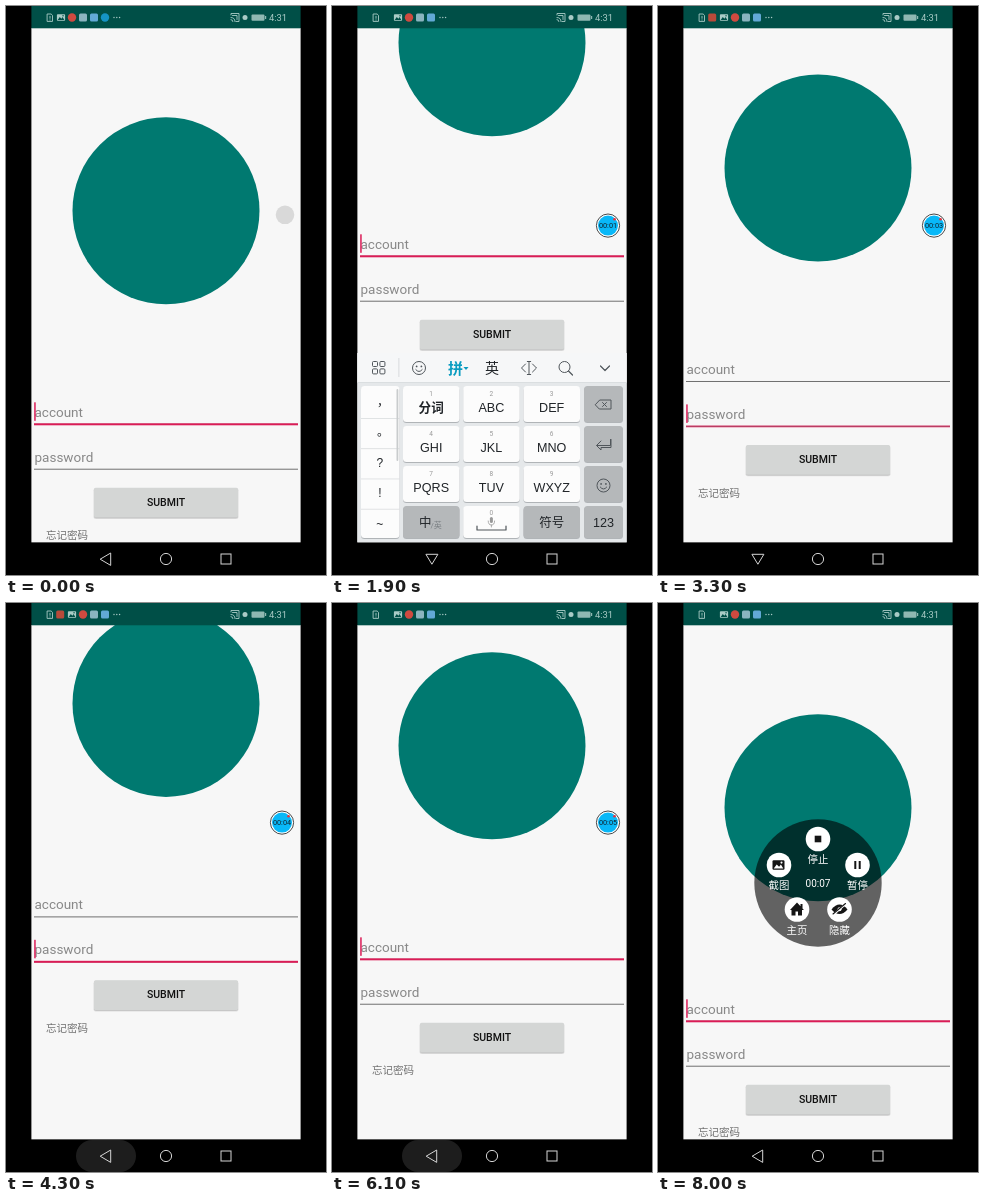
Recreate the animation shown at these times as an HTML page. Size 320 by 569 pixels, loop 8.1 s.

```html
<!DOCTYPE html>
<html lang="zh">
<head>
<meta charset="utf-8">
<title>Login keyboard demo</title>
<style>
html, body { margin: 0; width: 100%; height: 100%; overflow: hidden; background: #000; }
svg { display: block; width: 100vw; height: 100vh; font-family: Roboto, "Noto Sans CJK SC", "Noto Sans CJK", sans-serif; }
text { white-space: pre; }
.mid { text-anchor: middle; }
.cap { font-family: "Liberation Sans", "Noto Sans CJK SC", "Noto Sans CJK", sans-serif; }
.line { fill: none; stroke-linecap: round; stroke-linejoin: round; }
</style>
</head>
<body>
<svg id="stage" viewBox="0 0 320 569" xmlns="http://www.w3.org/2000/svg"></svg>
<script>
const LOOP = 8100, PAN = 168;
const LEFT = 25.4, WIDTH = 269.2, BOTTOM = 536.6;
const ACCENT = '#da1c56';
const stage = document.getElementById('stage');

const rect = (x, y, w, h, fill, r = 0, extra = '') =>
  `<rect x="${x}" y="${y}" width="${w}" height="${h}" rx="${r}" fill="${fill}" ${extra}/>`;
const disc = (x, y, r, fill, extra = '') =>
  `<circle cx="${x}" cy="${y}" r="${r}" fill="${fill}" ${extra}/>`;
const label = (x, y, size, fill, str, extra = '') =>
  `<text x="${x}" y="${y}" font-size="${size}" fill="${fill}" ${extra}>${str}</text>`;
const mid = (x, y, size, fill, str, extra = '') =>
  label(x, y, size, fill, str, 'text-anchor="middle" ' + extra);
const stroke = (d, color, w = 1, extra = '') =>
  `<path class="line" d="${d}" stroke="${color}" stroke-width="${w}" ${extra}/>`;
const group = (id, body, extra = '') => `<g id="${id}" ${extra}>${body}</g>`;

function smile(x, y, color) {
  return disc(x, y, 6.5, 'none', `stroke="${color}"`) + disc(x - 2.4, y - 1.6, .9, color) +
    disc(x + 2.4, y - 1.6, .9, color) + stroke(`M${x - 3.2} ${y + 1.6}q3.2 4 6.4 0`, color);
}

function picture(x, y, s, color, hole) {
  return rect(x - 5 * s, y - 4 * s, 10 * s, 8 * s, color, s) +
    `<path d="M${x - 4 * s} ${y + 3 * s}l${2.5 * s} ${-3.5 * s} ${2 * s} ${2 * s} ${1.5 * s} ${-2 * s} ${2 * s} ${3.5 * s}z" fill="${hole}"/>` +
    disc(x + 2.5 * s, y - 2 * s, .9 * s, hole);
}

function page() {
  const field = (y, id, name) =>
    label(28.5, y - 7.5, 13.5, '#888', name) +
    rect(28, y - .5, 264, 1, '#707070') +
    rect(28, y - 1, 264, 2, ACCENT, 0, `id="${id}Line"`) +
    rect(28.2, y - 22, 1.5, 18.5, ACCENT, 0, `id="${id}Caret"`);
  return disc(160, 204.8, 93.5, '#007970') +
    field(418.3, 'account', 'account') + field(463.2, 'password', 'password') +
    rect(87.5, 482.6, 145, 30.4, '#000', 2, 'opacity=".1"') +
    rect(88, 482.2, 144, 30, '#000', 2, 'opacity=".14"') +
    rect(88, 481.7, 144, 29.8, '#d4d6d5', 1.5) +
    mid(160, 499.8, 10.5, '#111', 'SUBMIT', 'font-weight="500"') +
    label(40, 533.4, 10.5, '#707070', '忘记密码');
}

function keyboard() {
  const ink = '#202428', soft = '#50565b';
  const cols = [71, 131.2, 191.5], rows = [380, 420, 460, 500];
  const key = (x, y, w, h, fill) =>
    rect(x, y + 1, w, h, '#9a9fa3', 3.5, 'opacity=".7"') + rect(x, y, w, h, fill, 3.5);
  let out = rect(25, 347, 270, 190, '#e5e8ea') + rect(25, 347, 270, 29.5, '#f6f7f8') +
    rect(25, 376, 270, .7, '#d3d7da');

  for (const dx of [0, 7.4]) for (const dy of [0, 7.4])
    out += rect(40.5 + dx, 355.5 + dy, 5, 5, 'none', 1, `stroke="${soft}"`);
  out += rect(66.5, 352, .8, 19, '#cfd3d6') + smile(87, 362, soft) +
    mid(123.5, 367.5, 15, '#0a9cc0', '拼', 'font-weight="700"') +
    '<path d="M131.5 361h5l-2.5 3z" fill="#0a9cc0"/>' +
    mid(160, 367, 14, ink, '英') +
    stroke('M193.5 358l-4 4 4 4M200.5 358l4 4-4 4M197 355.5v13M195.3 355.5h3.4M195.3 368.5h3.4', soft) +
    disc(232.5, 361, 5.5, 'none', `stroke="${soft}"`) + stroke('M236.5 365l4 4', soft, 1.2) +
    stroke('M268.5 360l4.5 4.5 4.5-4.5', soft, 1.2);

  out += key(29, 380, 38.5, 152, '#fcfcfc');
  ['，', '。', '?', '!', '~'].forEach((c, i) => {
    out += label(i < 2 ? 45 : 47.8, [400, 430, 460.5, 490.5, 521.5][i], 12, ink, c,
      i < 2 ? '' : 'class="mid cap"');
    if (i) out += rect(29, 382 + i * 30.2, 38.5, .7, '#d5d8da');
  });
  out += rect(64.5, 383, 1.8, 72, '#c9cccd', .9);

  ['分词', 'ABC', 'DEF', 'GHI', 'JKL', 'MNO', 'PQRS', 'TUV', 'WXYZ'].forEach((name, i) => {
    const x = cols[i % 3], y = rows[i / 3 | 0];
    out += key(x, y, 56.5, 36, '#fcfcfc') + mid(x + 28.2, y + 10, 6.5, '#999', i + 1) +
      mid(x + 28.2, y + 25.8, 12.6, ink, name, `class="cap" ${i ? '' : 'font-weight="700"'}`);
  });
  out += key(cols[0], 500, 56.5, 32, '#b5b8ba') + label(87, 521, 12.5, ink, '中') +
    label(98.5, 521.5, 8, '#7b8084', '/英') +
    key(cols[1], 500, 56.5, 32, '#fcfcfc') + mid(159.4, 509, 6.5, '#999', 0) +
    rect(157.9, 511, 3, 6, '#999', 1.5) + stroke('M156.2 515q0 4 3.2 4t3.2-4M159.4 519v2', '#999', .8) +
    stroke('M145 520v4h29v-4', soft, 1.2) +
    key(cols[2], 500, 56.5, 32, '#b5b8ba') + mid(219.7, 521, 12.5, ink, '符号');
  rows.forEach((y, i) => out += key(252, y, 39, i < 3 ? 36 : 32, '#b5b8ba'));
  return out + stroke('M263.5 398.5l4.2-4.5h11.3v9h-11.3zM270.5 396.5l4 4M274.5 396.5l-4 4', soft) +
    stroke('M278.5 433.5v6h-13.5M269 435l-4.5 4.5 4.5 4.5v-2.5h10v-8', soft) +
    smile(271.5, 479.5, soft) + mid(271.5, 521, 12.6, ink, '123', 'class="cap"');
}

function statusBar() {
  const pale = '#a9cbc6', dark = '#004f47';
  const red = '#cf4a40', sky = '#8ab4bf', blue = '#62a9d6';
  const apps = x => picture(x, 11.5, .82, pale, dark) + disc(x + 11, 11.5, 4.2, red) +
    rect(x + 18, 7.5, 8, 8, sky, 1.5) + rect(x + 29, 7.5, 8, 8, blue, 1.5);
  return rect(LEFT, 0, WIDTH, 22.3, dark) +
    stroke('M41.5 8h3.600l1.400 1.400v6h-5z', pale, .9) + stroke('M44 10.300v2M44 13.900v.2', pale, .9) +
    group('before', apps(55) + disc(99, 11.5, 4.2, '#1593c4')) +
    group('during', apps(66)) +
    rect(50.2, 7.5, 8, 8, '#b84a3a', 1.5, 'id="rec"') +
    [108, 110.8, 113.6].map(x => disc(x, 11.5, .7, pale)).join('') +
    stroke('M225 9v-1.5h8v8h-3M225 11.5q4 0 4 4M225 13.6q1.9 0 1.9 1.9M226.5 9.5h4.5v4', pale, .9) +
    disc(239, 11.5, 2.5, pale) +
    rect(245.5, 8.5, 13, 6.2, '#8fb8b2', 1) + rect(259, 10, 1.2, 3, '#8fb8b2') +
    label(263, 15, 9.4, pale, '4:31');
}

function navBar() {
  const c = '#d5d5d5';
  return rect(25, BOTTOM, 270, 33, '#000') +
    rect(70, 537, 60, 32, '#1d1d1d', 16, 'id="ripple"') +
    stroke('M94.5 553l10.2-6v12z', c, 1, 'id="back"') +
    stroke('M94.3 548.3h11.6l-5.8 9.6z', c, 1, 'id="down"') +
    disc(160, 553, 5.6, 'none', `stroke="${c}"`) +
    rect(215, 548, 10, 10, 'none', 0, `stroke="${c}"`);
}

function menu() {
  const k = '#151515';
  const item = (x, y, name) => disc(x, y, 12.3, '#fff') + mid(x, y + 24.3, 10.4, '#fff', name);
  return disc(0, 0, 63.7, '#000', 'opacity=".6"') +
    item(0, -44, '停止') + rect(-3.3, -47.3, 6.6, 6.6, k) +
    item(-39, -18, '截图') + picture(-39.5, -18, 1.2, k, '#fff') +
    item(39.5, -18, '暂停') + rect(36.3, -22, 2, 8, k) + rect(40.7, -22, 2, 8, k) +
    item(-21, 26.5, '主页') +
    `<path d="M-28 27l7-7.5 3.5 3.7v-2.2h2v4.4l1.5 1.6h-2v5.5h-4v-4h-2.5v4h-4v-5.5z" fill="${k}"/>` +
    item(21.5, 26.5, '隐藏') +
    `<path d="M13.5 26.5q8-10 16 0q-8 9-16 0z" fill="${k}"/>` + disc(21.5, 26.2, 2, '#fff') +
    stroke('M15.5 31.5l12-10.5', '#fff', 2.2) + stroke('M15 31l12.5-10.5', k, 1.1) +
    mid(0, 3.6, 10, '#fff', '00:00', 'id="menuTime"');
}

stage.innerHTML =
  `<defs><clipPath id="pageClip">${rect(LEFT, 22, WIDTH, BOTTOM - 22, '#000')}</clipPath></defs>` +
  rect(0, 0, 320, 569, '#000') + rect(LEFT, 22, WIDTH, BOTTOM - 22, '#f7f7f7') +
  `<g clip-path="url(#pageClip)">${group('page', page())}${group('keys', keyboard())}</g>` +
  statusBar() + navBar() +
  disc(279, 208.8, 9.3, '#d9d9d9', 'id="ball"') +
  group('badge', disc(0, 0, 11.6, '#fff', 'stroke="#333" stroke-width=".9"') + disc(0, 0, 10, '#08b8f8') +
    disc(6.5, -6.3, 1.3, '#e8323c') + mid(0, 2.6, 7.3, '#10222c', '00:00', 'id="badgeTime"')) +
  group('menu', menu());

const el = {};
stage.querySelectorAll('[id]').forEach(n => el[n.id] = n);
const set = (id, name, value) => el[id].setAttribute(name, value);
const fade = (id, v) => set(id, 'opacity', +v);

const ramp = (t, a, b) => Math.min(1, Math.max(0, (t - a) / (b - a)));
const ease = (t, a, b) => { const p = ramp(t, a, b); return p * p * (3 - 2 * p); };
const within = (t, spans) => spans.some(([a, b]) => t >= a && t < b);
// Alternating open and close starts, each lasting dur
const toggle = (t, starts, dur) =>
  starts.reduce((v, a, i) => v + (i % 2 ? -1 : 1) * ease(t, a, a + dur), 0);

const panStarts = [1180, 2275, 3202, 4175.500, 4975, 5924.500];
const keyStarts = [1200, 2200, 3360, 4080, 4840, 5890];
const caretOn = [[0, 400], [900, 1400], [1900, 2400], [2900, 3600], [4100, 4600],
  [4900, 5400], [5900, 6400], [6900, 7400], [7900, LOOP]];
const recOn = [[300, 1700], [2200, 2700], [3200, 3700], [4200, 4700]];
const keysUp = [[1150, 2250], [3150, 4180], [4880, 5950]];

function draw(t) {
  set('page', 'transform', `translate(0 ${-PAN * toggle(t, panStarts, 300)})`);

  const kb = toggle(t, keyStarts, 155);
  fade('keys', kb);
  set('keys', 'transform', `translate(0 ${38 * (1 - kb)})`);

  const onPass = t >= 3100 && t < 4860, caret = within(t, caretOn);
  fade('accountCaret', caret && !onPass);
  fade('passwordCaret', caret && onPass);
  fade('accountLine', 1 - ramp(t, 3100, 3220) + ramp(t, 4860, 4980));
  fade('passwordLine', ramp(t, 3150, 3380) - ramp(t, 4860, 4980));

  fade('before', t < 300);
  fade('during', t >= 300);
  fade('rec', within(t, recOn));

  const down = within(t, keysUp);
  fade('down', down);
  fade('back', !down);
  fade('ripple', [2170, 4100, 5900].reduce((v, a) =>
    v + ramp(t, a, a + 90) - ramp(t, a + 320, a + 480), 0));

  const sec = '00:0' + Math.max(0, Math.floor((t - 200) / 1000));
  el.badgeTime.textContent = el.menuTime.textContent = sec;
  fade('ball', 1 - ramp(t, 120, 300));
  const move = ease(t, 7250, 7600), open = ease(t, 7500, 7850);
  fade('badge', ramp(t, 200, 420) * (1 - ramp(t, 7500, 7650)));
  set('badge', 'transform', `translate(${276 - 116 * move} ${219.6 + 60.4 * move})`);
  fade('menu', open);
  set('menu', 'transform', `translate(160 280) scale(${.18 + .82 * open})`);
}

const start = performance.now();
function tick() {
  draw((performance.now() - start) % LOOP);
  requestAnimationFrame(tick);
}
draw(0);
requestAnimationFrame(tick);
</script>
</body>
</html>
```
